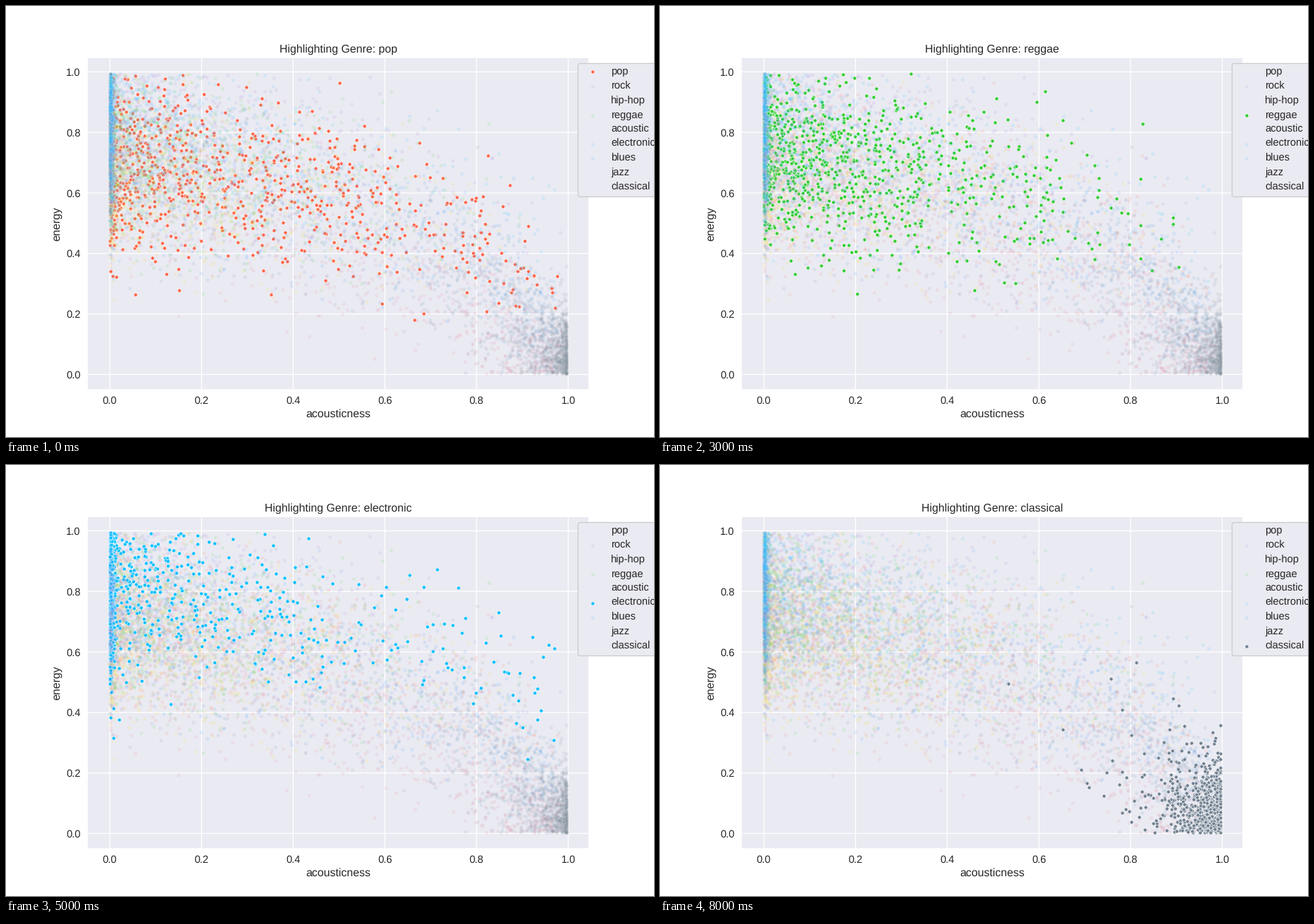
A matplotlib script that plays this animation: 917x611 px, repeating every 9000 ms.

```python
import matplotlib.pyplot as plt
import numpy as np
from matplotlib.animation import FuncAnimation

W, H, DPI = 917, 611, 64
K = 95.52 / DPI  # scales nominal points to this resolution
INK, PANEL = "#262626", "#eaeaf2"
FADED = 0.1
COUNT = 900

plt.rcParams.update({
    "font.family": "Liberation Sans",
    "text.color": INK,
    "text.hinting": "none",
    "axes.labelcolor": INK,
    "axes.facecolor": PANEL,
    "axes.edgecolor": "white",
    "axes.linewidth": 1.25 * K,
    "axes.labelsize": 12 * K,
    "axes.titlesize": 12 * K,
    "axes.titlepad": 5.6 * K,
    "axes.axisbelow": True,
    "legend.fontsize": 11 * K,
    "legend.labelspacing": 0.44,
    "patch.linewidth": K,
})

rng = np.random.default_rng(12)


def tracks(pile, high, fall, base):
    """Acousticness piles up at zero or near one; energy sinks as it grows."""
    pick = rng.random(COUNT)
    x = rng.beta(0.7, fall, COUNT)
    x = np.where(pick < pile, rng.exponential(0.003, COUNT), x)
    x = np.where(pick > 1 - high, rng.beta(10, 1.5, COUNT), x)
    mean = base - 0.5 * x / fall - 0.25 * x**6
    return x, rng.normal(mean, 0.14 * (1 - 0.45 * x**4))


def quiet_tracks():
    x = rng.beta(12, 0.45, COUNT)
    return x, rng.normal(0, 0.09 + 0.7 * (1 - x))


def inside(x, y):
    y = np.abs(y) + 0.002
    return 0.996 * x, np.where(y > 0.995, 1.99 - y, y)


GENRES = {
    "pop": ("tomato", tracks(0.08, 0.03, 2.1, 0.70)),
    "rock": ("mediumpurple", tracks(0.35, 0.01, 2.8, 0.80)),
    "hip-hop": ("gold", tracks(0.08, 0, 2.6, 0.66)),
    "reggae": ("limegreen", tracks(0.03, 0, 2.8, 0.73)),
    "acoustic": ("steelblue", tracks(0.05, 0.45, 1.2, 0.71)),
    "electronic": ("deepskyblue", tracks(0.50, 0.03, 2.6, 0.80)),
    "blues": ("dodgerblue", tracks(0.15, 0.04, 1.4, 0.74)),
    "jazz": ("palevioletred", tracks(0.03, 0.25, 1.0, 0.68)),
    "classical": ("slategray", quiet_tracks()),
}

fig = plt.figure(figsize=(W / DPI, H / DPI), dpi=DPI, facecolor="white")
ax = fig.add_axes([0.125, 0.11, 0.775, 0.77])
ax.set(xlim=(-0.0498, 1.0458), ylim=(-0.0498, 1.0468),
       xticks=np.arange(6) / 5, yticks=np.arange(6) / 5)
ax.set_xlabel("acousticness", labelpad=3.3 * K)
ax.set_ylabel("energy", labelpad=4.5 * K)
ax.tick_params(length=0, pad=7 * K, labelsize=11 * K, labelcolor=INK)
ax.grid(color="white", linewidth=K, snap=False)
title = ax.set_title("")

names = list(GENRES)
clouds = [
    ax.scatter(*inside(*points), s=15 * K**2, color=color,
               edgecolor="white", linewidth=0.48 * K, label=name, zorder=2)
    for name, (color, points) in GENRES.items()
]
legend = ax.legend(loc="upper right", bbox_to_anchor=(1.15, 1), scatterpoints=1,
                   facecolor=PANEL, edgecolor="0.8", framealpha=1)
faint_keys = {"rock", "reggae", "electronic", "blues"}


def update(i):
    title.set_text(f"Highlighting Genre: {names[i]}")
    for j, (name, cloud, key) in enumerate(zip(names, clouds, legend.legend_handles)):
        cloud.set_alpha(1 if j == i else FADED)
        key.set_alpha(1 if j == i else FADED * (name in faint_keys))
    return [title, legend, *clouds]


anim = FuncAnimation(fig, update, frames=len(names), interval=1000,
                     repeat=True, repeat_delay=0, blit=False)
plt.show()
```
